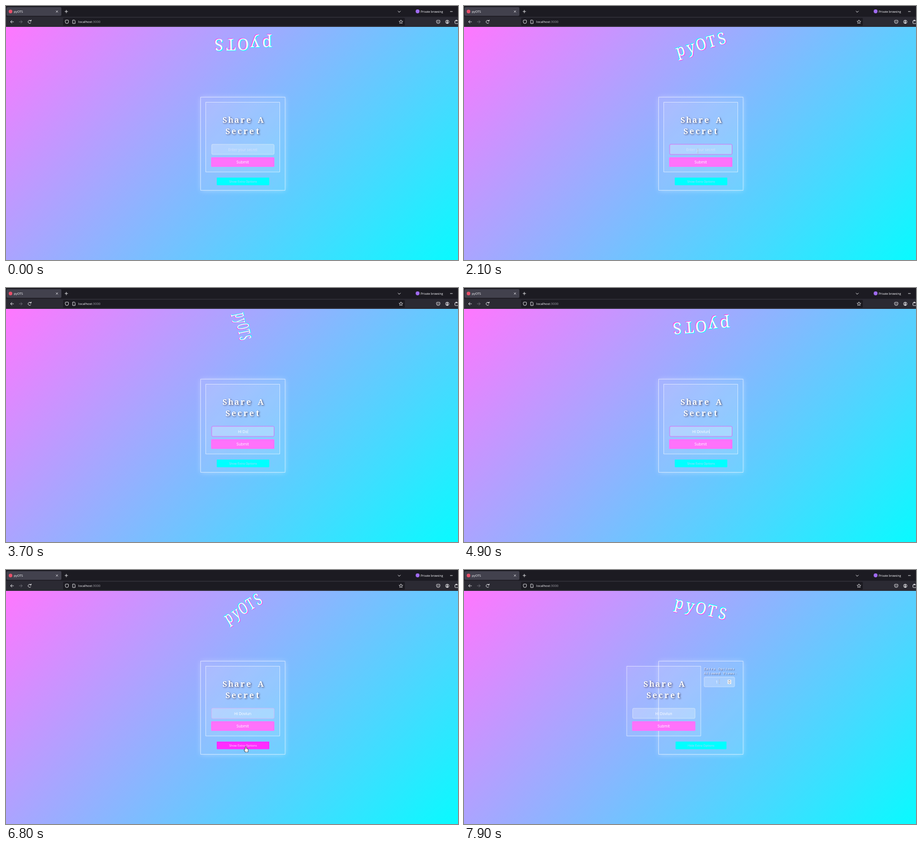
Animation of 800 by 450 pixels, one loop 8 s. Source, as an HTML page with a canvas:

```html
<!DOCTYPE html>
<html lang="en">
<head>
<meta charset="utf-8">
<title>pyOTS</title>
<style>
  html, body { margin: 0; width: 100%; height: 100%; overflow: hidden; background: #1c1b22; }
  canvas { display: block; width: 800px; height: 450px; }
</style>
</head>
<body>
<canvas id="stage" width="800" height="450"></canvas>
<script>
const ctx = document.getElementById('stage').getContext('2d');
const LOOP = 8000;
const PAGE_TOP = 37;
const MID = 419;
const SANS = '"Open Sans", "Noto Sans", sans-serif';
const SLAB = '"Noto Serif", "Liberation Serif", serif';
const INK = '#fbfbfe';
const GLASS = 'rgba(255,255,255,0.24)';
const SECRET = 'Hi Dovlun';

const clamp = v => Math.max(0, Math.min(1, v));
const mix = (a, b, k) => a + (b - a) * k;
const ramp = (t, start, length) => {
  const k = clamp((t - start) / length);
  return k * k * (3 - 2 * k);
};

function box(x, y, w, h, r, fill, stroke, width = 0.8) {
  ctx.beginPath();
  ctx.roundRect(x, y, w, h, r);
  if (fill) { ctx.fillStyle = fill; ctx.fill(); }
  if (stroke) { ctx.strokeStyle = stroke; ctx.lineWidth = width; ctx.stroke(); }
}

function text(str, x, y, size, color, align = 'center', family = SANS, weight = '') {
  ctx.font = `${weight} ${size}px ${family}`;
  ctx.textAlign = align;
  ctx.fillStyle = color;
  ctx.fillText(str, x, y);
}

// Typewriter setting: every letter centred in a cell of equal width.
function typewriter(str, left, y, pitch, color, weight = '') {
  [...str].forEach((ch, i) =>
    text(ch, left + (i + 0.5) * pitch, y, pitch * 1.33, color, 'center', SLAB, weight));
}

function line(color, width, ...pts) {
  ctx.strokeStyle = color;
  ctx.lineWidth = width;
  ctx.beginPath();
  for (let i = 0; i < pts.length; i += 2) ctx.lineTo(pts[i], pts[i + 1]);
  ctx.stroke();
}

function arc(x, y, r, from = 0, to = Math.PI * 2, color = INK) {
  ctx.beginPath();
  ctx.arc(x, y, r, from, to);
  ctx.strokeStyle = color;
  ctx.lineWidth = 0.8;
  ctx.stroke();
}

const disc = (x, y, r, fill) => box(x - r, y - r, 2 * r, 2 * r, r, fill);
const chevron = (x, y, s, dir, color = INK) =>
  line(color, 0.8, x - s, y - s * dir / 2, x, y + s * dir / 2, x + s, y - s * dir / 2);

function arrow(x, y, dir, color) {
  line(color, 0.8, x - 2.8, y, x + 2.8, y);
  line(color, 0.8, x + dir * 0.2, y - 2.6, x + dir * 2.8, y, x + dir * 0.2, y + 2.6);
}

function star(x, y, r) {
  ctx.beginPath();
  for (let i = 0; i <= 10; i++) {
    const a = i * Math.PI / 5 - Math.PI / 2, d = i % 2 ? r * 0.46 : r;
    ctx.lineTo(x + d * Math.cos(a), y + d * Math.sin(a));
  }
  ctx.strokeStyle = INK;
  ctx.lineWidth = 0.7;
  ctx.stroke();
}

function drawBrowser() {
  ctx.fillStyle = '#1c1b22';
  ctx.fillRect(0, 0, 800, 19);
  ctx.fillStyle = '#2b2a33';
  ctx.fillRect(0, 19, 800, PAGE_TOP - 19);

  box(1, 2, 97, 15.5, 2, '#42414d');
  disc(8, 9.7, 3.2, '#e8506a');
  text('pyOTS', 14, 12, 5.4, INK, 'left');
  for (const d of [-1.7, 1.7]) line(INK, 0.7, 90.2 - d, 8.1, 90.2 + d, 11.5);
  line(INK, 0.8, 104, 9.8, 109.6, 9.8);
  line(INK, 0.8, 106.8, 7, 106.8, 12.6);
  chevron(696, 10, 2.4, 1);
  disc(728.5, 9.5, 3.4, '#a06bf0');
  text('Private browsing', 734, 11.9, 5.1, INK, 'left');
  line(INK, 0.8, 786, 9.8, 790.5, 9.8);

  arrow(10.8, 28, -1, INK);
  arrow(26, 28, 1, '#77767f');
  arc(41.8, 28, 2.7, 0.5, 5.6);
  line(INK, 0.9, 42.2, 26.6, 44.6, 26.6, 44.6, 24.4);

  box(101, 21, 605, 14, 2, '#1c1b22');
  box(105, 25, 5.6, 6, [1, 1, 3, 3], null, INK);
  box(118, 25, 4.3, 6, [0, 1.6, 0, 0], null, INK);
  text('localhost', 128, 30.3, 5.8, INK, 'left');
  text(':3000', 128 + ctx.measureText('localhost').width, 30.3, 5.8, '#a09fa8', 'left');
  star(699, 28.2, 3.5);

  box(762, 25.3, 6, 5.6, [1, 1, 3, 3], null, INK);
  chevron(765, 28, 1.5, 1);
  arc(781, 28, 3);
  disc(781, 27, 1.1, INK);
  disc(781, 29.8, 1.3, INK);
  box(794.5, 26, 8, 5, 1, null, INK);
  disc(797, 25.6, 1.2, INK);
}

function drawBackdrop() {
  const g = ctx.createLinearGradient(106.25, -69.25, 731.75, 556.25);
  g.addColorStop(0, '#ff77ff');
  g.addColorStop(1, '#00ffff');
  ctx.fillStyle = g;
  ctx.fillRect(0, PAGE_TOP, 800, 450 - PAGE_TOP);
}

// The word turns along an ellipse: its length shrinks as it nears vertical.
function drawLogo(t) {
  const a = (178 + t * 0.072) * Math.PI / 180;
  const ax = Math.cos(a), ay = 0.47 * Math.sin(a);
  const len = Math.hypot(ax, ay);
  const pitch = 21.4;
  ctx.save();
  ctx.transform(ax, ay, -ay / len, ax / len, 419.5, 68);
  const word = (d, color) => typewriter('pyOTS', d - 2.5 * pitch, d + 10, pitch, color);
  word(0.9, '#ff40e0');
  word(-0.9, '#00ffff');
  word(0, '#ffffff');
  ctx.restore();
}

function card(x, y, w, h) {
  const far = 2000;
  ctx.save();
  ctx.beginPath();
  ctx.rect(0, 0, 800, 450);
  ctx.rect(x, y, w, h);
  ctx.clip('evenodd');
  ctx.shadowColor = 'rgba(255,255,255,0.45)';
  ctx.shadowBlur = 9;
  ctx.shadowOffsetX = far;
  ctx.fillRect(x - far, y, w, h);
  ctx.restore();
  box(x, y, w, h, 0, 'rgba(255,255,255,0.09)', 'rgba(255,255,255,0.6)', 0.9);
}

function shaded(offset, blur, paint) {
  ctx.save();
  ctx.shadowColor = 'rgba(45,40,75,0.8)';
  ctx.shadowOffsetX = ctx.shadowOffsetY = offset;
  ctx.shadowBlur = blur;
  paint();
  ctx.restore();
}

function drawSecret(t) {
  const typed = Math.max(0, Math.min(SECRET.length, Math.floor((t - 2900) / 180) + 1));
  if (!typed) {
    text('Enter your secret', MID, 256.6, 6.5, 'rgba(225,230,250,0.78)');
    return;
  }
  const str = SECRET.slice(0, typed);
  text(str, MID, 256.6, 6.6, '#fff');
  const blink = t < 4500 || (t - 4500) % 1060 < 530;
  if (t < 6650 && blink) {
    const x = MID + ctx.measureText(str).width / 2 + 0.5;
    line('#fff', 0.5, x, 250.5, x, 257.8);
  }
}

function drawForm(t, dx) {
  ctx.save();
  ctx.translate(dx, 0);
  card(353.5, 170.5, 131, 123.5);
  const pitch = 10.56;
  shaded(1.4, 3, () => {
    typewriter('Share A', MID - 3.5 * pitch, 207, pitch, '#fff', 'bold');
    typewriter('Secret', MID - 3 * pitch, 226.5, pitch, '#fff', 'bold');
  });

  const focus = ramp(t, 1750, 250) * (1 - ramp(t, 6650, 300));
  const rim = `rgba(${mix(255, 230, focus)},${mix(255, 85, focus)},240,${mix(0.5, 0.9, focus)})`;
  box(364, 245, 110.5, 18, 2, GLASS, rim);
  drawSecret(t);

  const hover = ramp(t, 5350, 200) * (1 - ramp(t, 6450, 200));
  box(363, 268, 112, 17, 1.5, `rgb(255,${mix(114, 88, hover)},251)`);
  text('Submit', MID, 279, 6.6, '#fff');
  ctx.restore();
}

function drawOptions(k) {
  if (k <= 0) return;
  ctx.save();
  ctx.globalAlpha = k;
  shaded(0.8, 1.2, () => {
    typewriter('Extra Options', 424.3, 177, 4.22, '#f4f6ff');
    typewriter('Allowed Views:', 424.3, 184.8, 4.22, '#f4f6ff');
  });
  box(425, 189.5, 54, 17.5, 2, GLASS, 'rgba(255,255,255,0.5)');
  text('1', 447.5, 200.7, 6.6, '#fff');
  box(466.5, 194.5, 6.5, 7.5, 0.8, '#eef0f4');
  for (const d of [-1, 1]) chevron(469.7, 198.2 + d * 1.7, 1.5, d, '#555a66');
  ctx.restore();
}

function drawToggle(t) {
  const hover = ramp(t, 6550, 200) * (1 - ramp(t, 7450, 250));
  const open = t >= 6900;
  const w = open ? 90 : 93;
  box(MID + 0.5 - w / 2, 304, w, 13.4, 0.8, `rgb(${mix(0, 255, hover)},${mix(255, 45, hover)},255)`);
  const ink = `rgb(${mix(185, 255, hover)},${mix(205, 225, hover)},250)`;
  text((open ? 'Hide' : 'Show') + ' Extra Options', MID + 0.5, 312.5, 5.4, ink);
}

function beam(x, y) {
  const color = 'rgba(185,185,195,0.85)';
  line(color, 0.7, x, y - 3.5, x, y + 3.5);
  for (const d of [-3.5, 3.5]) line(color, 0.7, x - 1.2, y + d, x + 1.2, y + d);
}

function hand(x, y) {
  for (const edge of [0.6, 0]) {
    const fill = edge ? '#222' : '#fff';
    box(x - 3.2 - edge, y - edge, 2.6 + 2 * edge, 2 + 2 * edge, 1, fill);
    box(x - 1.8 - edge, y - 1 - edge, 5 + 2 * edge, 5.5 + 2 * edge, 1.3, fill);
    box(x - 1.2 - edge, y - 4.4 - edge, 1.6 + 2 * edge, 6 + 2 * edge, 0.8, fill);
  }
}

function drawPointer(t) {
  if (t < 800 || (t >= 2900 && t < 5000)) return;
  const rise = ramp(t, 800, 300), down = ramp(t, 5050, 450);
  const over = ramp(t, 6350, 350), away = ramp(t, 7350, 450);
  const x = 414 + down + over * 10 + away * 27;
  const y = mix(263, 257, rise) + down * 31 + over * 30 - away * 120;
  const onButton = (y > 266 && y < 292) || (y > 302 && y < 322);
  (onButton ? hand : beam)(x, y);
}

function draw(t) {
  const slide = ramp(t, 6900, 500);
  drawBackdrop();
  drawLogo(t);
  card(344.5, 161.5, 149.5, 165);
  drawOptions(slide);
  drawForm(t, -65.5 * slide);
  drawToggle(t);
  drawBrowser();
  drawPointer(t);
}

const begin = performance.now();
function tick() {
  draw((performance.now() - begin) % LOOP);
  requestAnimationFrame(tick);
}
tick();
</script>
</body>
</html>
```
